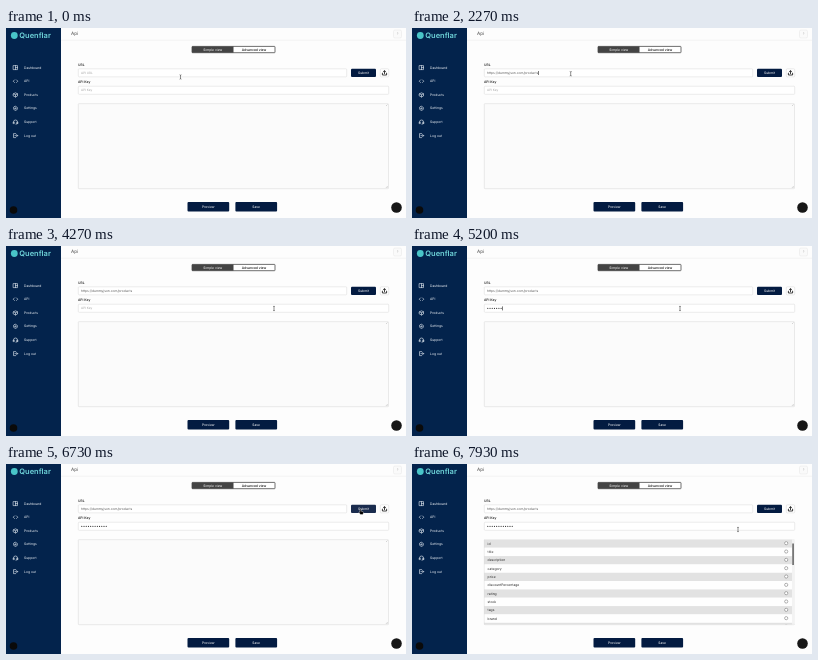
An HTML page for the animation above (8 s loop, 400 by 190 pixels).

```html
<!DOCTYPE html>
<html lang="en">
<head>
<meta charset="utf-8">
<title>Api</title>
<style>
  html, body { margin: 0; width: 100%; height: 100%; overflow: hidden; background: #fdfdfd; }
  svg { display: block; width: 100vw; height: 100vh; }
  text { font: 3.35px Inter, sans-serif; text-rendering: geometricPrecision; dominant-baseline: central; }
  .label { font-weight: 500; fill: #111; }
  .button { fill: #031b41; }
  .field { fill: #fff; stroke: #dedede; stroke-width: .6; }
  .on-dark { fill: #fff; text-anchor: middle; }
  .icon { fill: none; stroke: #e8eef5; stroke-width: .6; stroke-linecap: round; stroke-linejoin: round; }
  .hint { fill: #a5a5a5; font-size: 3.1px; }
  .value { fill: #555; font-size: 3.25px; }
</style>
</head>
<body>
<svg viewBox="0 0 400 190">
  <defs>
    <clipPath id="listClip"><rect x="72" y="75.5" width="311" height="85"/></clipPath>
  </defs>

  <rect width="400" height="190" fill="#fdfdfd"/>
  <rect x="55" y="11.8" width="345" height=".6" fill="#ececec"/>
  <text x="65" y="6.2" style="font-size:4.6px" fill="#444">Api</text>
  <rect x="387.5" y="2" width="8" height="8" rx="1.5" fill="#fafafa" stroke="#e4e4e4" stroke-width=".5"/>
  <text x="391.5" y="6" text-anchor="middle" fill="#aaa">?</text>

  <rect width="55" height="190" fill="#03234c"/>
  <circle cx="8.3" cy="7.5" r="3.4" fill="#49c5c8"/>
  <text x="13.3" y="7.5" style="font-size:7.5px;font-weight:600" fill="#6fd5da">Quenflar</text>
  <g id="menu"></g>
  <circle cx="7.5" cy="182" r="3.8" fill="#0a0a0a"/>

  <rect x="186" y="18.4" width="83" height="6.3" rx=".6" fill="#fff" stroke="#333" stroke-width=".7"/>
  <rect x="186" y="18.4" width="41.5" height="6.3" fill="#444"/>
  <text class="on-dark" x="206.8" y="21.5">Simple view</text>
  <text class="label" x="248" y="21.5" text-anchor="middle">Advanced view</text>

  <text class="label" x="72" y="36.5">URL</text>
  <rect class="field" x="72.3" y="40.8" width="268.4" height="8.1" rx=".8"/>
  <text class="hint" id="urlHint" x="75" y="45">API URL</text>
  <text class="value" id="url" x="75" y="45">https://dummyjson.com/products</text>

  <rect class="button" id="submit" x="345" y="40.8" width="25" height="8.2" rx="1"/>
  <text class="on-dark" x="357.5" y="45">Submit</text>
  <rect class="field" x="374.3" y="40.8" width="8.4" height="8.1" rx="1"/>
  <path d="M378.5 45.6V42.8M377.2 44L378.5 42.7L379.8 44M376.4 45.4V47H380.6V45.4" class="icon" style="stroke:#111;stroke-width:.8"/>

  <text class="label" x="72" y="53.6">API Key</text>
  <rect class="field" x="72.3" y="58.2" width="310.4" height="8.1" rx=".8"/>
  <text class="hint" id="keyHint" x="75" y="62.4">API Key</text>
  <g id="dots" fill="#333"></g>
  <rect id="caret" width=".6" height="4" fill="#222"/>

  <rect x="72.3" y="75.7" width="310.2" height="85" rx=".6" fill="#fbfbfb" stroke="#dcdcdc" stroke-width=".6"/>
  <path id="grips" d="M380 78L381.5 76.5M380 159.8L381.7 158.1M381 159.8L381.7 159.1" stroke="#999" stroke-width=".4"/>
  <g id="list" clip-path="url(#listClip)"></g>

  <rect class="button" x="181.5" y="174" width="41.7" height="9.4" rx="1"/>
  <text class="on-dark" x="202.3" y="178.7">Preview</text>
  <rect class="button" x="229.4" y="174" width="41.7" height="9.4" rx="1"/>
  <text class="on-dark" x="250.2" y="178.7">Save</text>
  <circle cx="390.5" cy="179.5" r="5.3" fill="#171717"/>

  <g id="cursor">
    <path id="beam" d="M-.9 -2.2Q0 -2.2 0 -1.5Q0 -2.2 .9 -2.2M0 -1.5V1.5M-.9 2.2Q0 2.2 0 1.5Q0 2.2 .9 2.2" fill="none" stroke="#444" stroke-width=".6"/>
    <path id="arrow" d="M0 -1V3.6L1.1 2.6L1.9 4.2L2.7 3.8L1.9 2.3H3.4Z" fill="#000" stroke="#fff" stroke-width=".3"/>
    <path id="hand" d="M-.6 -1.4Q0 -2 .5 -1.4V.6L2.6 1.2Q3.2 1.5 2.9 2.6L2.4 4H-.1L-1.7 1.8Q-1.6 1.1 -.6 1.7Z" fill="#000" stroke="#fff" stroke-width=".35"/>
  </g>
</svg>
<script>
const LOOP = 8000;
const PASTE = 1870, FOCUS_KEY = 3730, TYPE = 4730, TYPE_STEP = 70, DOT_COUNT = 12;
const CLICK = 6730, RESULT = 7130, BLINK = 530;
const DOT_GAP = 2.22;
const el = id => document.getElementById(id);
const show = (id, on) => { el(id).style.display = on ? '' : 'none'; };

// Icon paths are centred on 0,0.
const menu = [
  ['Dashboard', 'M-2 -2H2V2H-2ZM0 -2V2M0 0H2'],
  ['API', 'M-1 -1.3L-2.3 0L-1 1.3M1 -1.3L2.3 0L1 1.3'],
  ['Products', 'M-2 -1L0 -2L2 -1V1.2L0 2.2L-2 1.2ZM-2 -1L0 0L2 -1M0 0V2.2'],
  ['Settings', 'M0 -2.1L1.8 -1V1L0 2.1L-1.8 1V-1ZM-.6 0A.6 .6 0 1 0 .6 0A.6 .6 0 1 0 -.6 0'],
  ['Support', 'M-2 .4V0A2 2 0 0 1 2 0V.4M-2 .2H-1.2V1.6H-2ZM2 .2H1.2V1.6H2ZM2 1.6Q1.8 2.2 .4 2.2'],
  ['Log out', 'M.2 -2H-2V2H.2M-.6 0H2.2M1.1 -1.1L2.2 0L1.1 1.1']
];
el('menu').innerHTML = menu.map(([name, icon], i) => {
  const y = 39.6 + i * 13.6;
  return `<path class="icon" transform="translate(9.5 ${y})" d="${icon}"/>
    <text x="18" y="${y}" fill="#f2f5f9">${name}</text>`;
}).join('');

const fields = ['id', 'title', 'description', 'category', 'price', 'discountPercentage',
  'rating', 'stock', 'tags', 'brand', ''];
el('list').innerHTML = '<rect x="72.5" y="75.5" width="310" height="85" fill="#fff"/>' +
  fields.map((name, i) => {
    const y = 79.6 + i * 8.33;
    return `<rect x="72" y="${y - 4.16}" width="308" height="8.33" fill="${i % 2 ? '#fefefe' : '#e2e2e2'}"/>
      <text x="75.6" y="${y}" fill="#222">${name}</text>
      <circle cx="374.2" cy="${y - .4}" r="1.6" fill="#fff" stroke="#666" stroke-width=".5"/>`;
  }).join('') +
  '<rect x="380" y="75.5" width="2.5" height="85" fill="#f3f3f3"/>' +
  '<rect x="380.2" y="79.5" width="1.8" height="21.5" fill="#777"/>' +
  '<path d="M72.2 75.5V160.3H382.5" fill="none" stroke="#d8d8d8" stroke-width=".5"/>';

el('dots').innerHTML = Array.from({ length: DOT_COUNT }, (_, i) =>
  `<circle cx="${75.8 + i * DOT_GAP}" cy="62.4" r=".55"/>`).join('');

// Pointer stops: time, x, y
const path = [
  [0, 174.5, 49], [70, 174.5, 49], [330, 173.5, 46],
  [870, 173.5, 46], [1200, 158, 45], [1530, 150, 45.5],
  [2200, 150, 45.5], [2470, 169, 46],
  [3070, 169, 46], [3200, 254, 52], [3730, 268, 62.5],
  [5600, 268, 62.5], [6270, 354.5, 46.5],
  [7400, 354.5, 46.5], [7600, 339, 54.5],
  [7800, 339, 54.5], [7930, 326, 65.5], [LOOP, 326, 65.5]
];

function pointerAt(t) {
  const i = path.findIndex(stop => stop[0] > t);
  const [t0, x0, y0] = path[i - 1], [t1, x1, y1] = path[i];
  const p = (t - t0) / (t1 - t0), k = p * (2 - p);
  return [x0 + (x1 - x0) * k, y0 + (y1 - y0) * k];
}

const inside = (x, y, left, top, right, bottom) => x > left && x < right && y > top && y < bottom;

// The blink restarts at every edit.
function caretOn(t, typed) {
  if (t < 470 || t >= CLICK || (t >= 3600 && t < FOCUS_KEY)) return false;
  const lastEdit = typed ? TYPE + (typed - 1) * TYPE_STEP
    : t >= FOCUS_KEY ? FOCUS_KEY
    : t >= PASTE ? PASTE : 470;
  return Math.floor((t - lastEdit) / BLINK) % 2 === 0;
}

function draw(t) {
  const typed = Math.max(0, Math.min(DOT_COUNT, Math.floor((t - TYPE) / TYPE_STEP) + 1));
  const pasted = t >= PASTE, done = t >= RESULT, inKey = t >= FOCUS_KEY;
  show('urlHint', !pasted);
  show('url', pasted);
  show('keyHint', !typed);
  [...el('dots').children].forEach((dot, i) => { dot.style.display = i < typed ? '' : 'none'; });
  show('list', done);
  show('grips', !done);

  show('caret', caretOn(t, typed));
  el('caret').setAttribute('x', inKey ? 74.7 + typed * DOT_GAP : pasted ? 126.3 : 74.6);
  el('caret').setAttribute('y', inKey ? 60.4 : 43);

  const [x, y] = pointerAt(t);
  const onButton = inside(x, y, 345, 40.8, 370, 49);
  const onField = inside(x, y, 72, 40.5, 341, 49.5) || inside(x, y, 72, 58, 383, 66.5);
  show('hand', onButton);
  show('beam', onField);
  show('arrow', !onButton && !onField);
  el('cursor').setAttribute('transform', `translate(${x} ${y})`);
  el('submit').style.fill = onButton ? '#1a2c4e' : '';
}

const start = performance.now();
function tick() {
  draw((performance.now() - start) % LOOP);
  requestAnimationFrame(tick);
}
tick();
</script>
</body>
</html>
```
